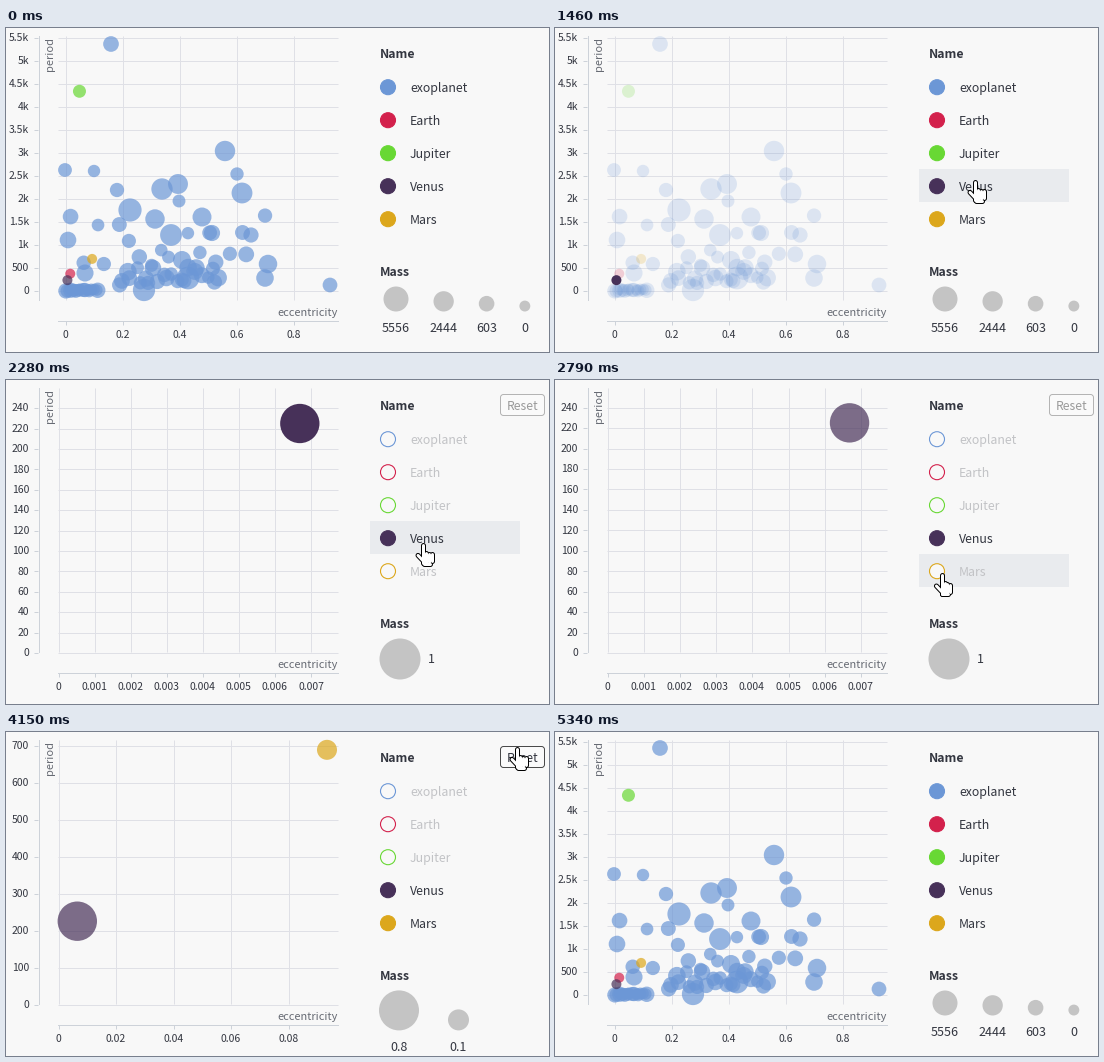
A matplotlib script that plays this animation: 543x324 px, repeating every 6.05 s.

```python
import matplotlib.pyplot as plt
import numpy as np
from matplotlib.animation import FuncAnimation
from matplotlib.collections import LineCollection
from matplotlib.colors import to_rgb
from matplotlib.patches import Circle, FancyBboxPatch, Rectangle
from matplotlib.transforms import Affine2D

W, H, DPI = 543, 324, 72          # at 72 dpi one point is one pixel
LOOP, STEP = 6050, 25
LEFT, RIGHT, TOP, BOTTOM = 52, 332, 8, 272
BG, GRID, AXIS, INK, MUTED = "#f8f8f8", "#dfe0e6", "#cdd2d9", "#333640", "#c2c3c6"

plt.rcParams["font.family"] = ["Noto Sans CJK JP", "DejaVu Sans"]
rng = np.random.default_rng(4)

NAMES = ["exoplanet", "Earth", "Jupiter", "Venus", "Mars"]
COLORS = ["#6c97d6", "#d3214c", "#68d834", "#473159", "#dca71c"]
ROW_Y = [59 + 33 * i for i in range(5)]
PLANETS = {1: (0.0167, 365), 2: (0.049, 4331), 3: (0.0067, 224.7), 4: (0.0934, 687)}

# The conspicuous exoplanets in stage pixels, from largest to smallest
KEY_EXO = [(124, 182), (182, 250), (138, 262), (165, 207), (156, 161), (236, 165),
           (219, 123), (172, 156), (149, 191), (196, 189), (262, 236), (176, 232),
           (259, 250), (79, 245), (62, 212), (206, 205), (105, 16), (245, 207),
           (324, 257), (111, 162), (59, 142), (231, 146), (173, 173), (88, 143)]


def swarm(n, xs, ys, rs):
    """Evenly spread columns with random heights and radii."""
    gap = (xs[1] - xs[0]) / n
    x = np.linspace(*xs, n) + rng.uniform(-gap / 2, gap / 2, n)
    return np.column_stack([x, rng.uniform(*ys, n), rng.uniform(*rs, n)])


def view(x0, kx, y0, ky, xticks, yticks, radii):
    return dict(x0=x0, kx=kx, y0=y0, ky=ky, xticks=xticks, yticks=yticks,
                radii=radii, shown=set(radii))


def steps(step, count):
    return [i * step for i in range(count + 1)]


FULL = view(59.5, 285, 262.5, 0.046, steps(0.2, 4), steps(500, 11),
            {0: 0, 1: 5, 2: 6.5, 3: 5, 4: 5})
ONE = view(52, 36200, 272.5, 1.022, steps(0.001, 7), steps(20, 12), {3: 19.7})
TWO = view(52, 2880, 272.5, 0.3707, steps(0.02, 4), steps(100, 7), {3: 19.7, 4: 10})
VIEWS = [FULL, ONE, TWO]

# start, duration, from, to
MOVES = [(1730, 600, FULL, ONE), (3185, 600, ONE, TWO), (4670, 630, TWO, FULL)]

# time, x, y of the pointer's fingertip
POINTER = np.array([
    (700, 424, -30), (1340, 420, 152), (1770, 420, 152), (2000, 417, 163),
    (2400, 417, 163), (2780, 386, 194), (3830, 386, 194), (4130, 511, 15),
    (4440, 511, 15), (4460, 513, 17), (4930, 513, 17), (5220, 558, 30)])


def lerp(a, b, p):
    return a + (b - a) * p


def ease(u):
    return 4 * u ** 3 if u < 0.5 else 1 - 4 * (1 - u) ** 3


def phase(t):
    """The views before and after the latest move, and its eased progress."""
    for start, length, a, b in reversed(MOVES):
        if t >= start:
            return a, b, ease(min((t - start) / length, 1))
    return FULL, FULL, 1


def tip(t):
    return [np.interp(t, POINTER[:, 0], POINTER[:, k]) for k in (1, 2)]


def hovered(t):
    x, y = tip(t)
    if 364 < x < 514:
        for i, row in enumerate(ROW_Y):
            if abs(y - row) < 16.5:
                return i
    return None


def target_alpha(t):
    row = hovered(t)
    if t < MOVES[1][0] and row in phase(t)[1]["shown"]:
        return [1.0 if i == row else 0.2 for i in range(5)]
    return [0.7] * 5


def mark_alpha(t):
    return np.mean([target_alpha(t - d) for d in range(0, 125, 25)], axis=0)


def pos_x(v, s):
    return min(s["x0"] + s["kx"] * v, RIGHT)


def pos_y(v, s):
    return max(s["y0"] - s["ky"] * v, TOP)


def tick_label(v):
    return f"{v / 1000:g}k" if v >= 1000 else f"{v:g}"


def crisp(v):
    return np.floor(v) + 0.5


def rgba(color, alpha):
    return (*to_rgb(color), alpha)


fig = plt.figure(figsize=(W / DPI, H / DPI), dpi=DPI, facecolor=BG)
ax = fig.add_axes([0, 0, 1, 1])
ax.set_xlim(0, W)
ax.set_ylim(H, 0)
ax.axis("off")


def label(x, y, text, size, color=INK, ha="left", **kw):
    return ax.text(x, y, text, fontsize=size, color=color, ha=ha, va="baseline", **kw)


def disc(x, y, r, **kw):
    return ax.add_patch(Circle((x, y), r, **kw))


# Axes and grid
grid = ax.add_collection(LineCollection([], linewidths=1, zorder=1))
ax.plot([32.5, 32.5], [TOP, BOTTOM], color=AXIS, lw=1, zorder=1)
ax.plot([LEFT, RIGHT], [292.5, 292.5], color=AXIS, lw=1, zorder=1)
label(RIGHT, 288, "eccentricity", 11, "#666a73", "right")
label(47.5, 9, "period", 11, "#666a73", "right", rotation=90, rotation_mode="anchor")
xlabels = {tick_label(v): label(0, 310, tick_label(v), 10.4, ha="center")
           for s in VIEWS for v in s["xticks"]}
ylabels = {tick_label(v): label(23, 0, tick_label(v), 10.4, ha="right")
           for s in VIEWS for v in s["yticks"]}
for spare in list(ax.texts):
    spare.set_visible(spare not in (*xlabels.values(), *ylabels.values())
                      and not spare.get_text()[0].isdigit())

# Marks: exoplanets, then planets
exo = np.vstack([
    np.column_stack([KEY_EXO, np.linspace(11.6, 6.2, len(KEY_EXO))]),
    swarm(16, (59, 92), (261, 263), (5.2, 7.8)),
    swarm(24, (112, 214), (238, 262), (6.2, 9)),
    swarm(18, (66, 256), (184, 238), (5.5, 8)),
])
exo_dots = ax.scatter(exo[:, 0], exo[:, 1], s=(2 * exo[:, 2]) ** 2, linewidths=0, zorder=3)
dots = {i: disc(0, 0, 5, lw=0, zorder=4) for i in (2, 1, 3, 4)}

# Name legend
label(374, 30, "Name", 12.3, weight="bold")
label(374, 248, "Mass", 12.3, weight="bold")
row_bar = ax.add_patch(Rectangle((364, 0), 150, 33, fc="#e9ebee", lw=0, zorder=0))
keys = [(disc(382, y + 0.2, 7.5, ec=color, lw=1.1, zorder=2),
         label(404, y + 4.8, name, 12.3), color)
        for name, color, y in zip(NAMES, COLORS, ROW_Y)]
cross = [ax.plot([379.5, 384.5], [191.2 - d, 191.2 + d], color="white", lw=1.8, zorder=3)[0]
         for d in (2.5, -2.5)]

# Reset button
button = ax.add_patch(FancyBboxPatch((496.5, 16.5), 40, 17, fc="#fafafa", lw=1, zorder=2,
                                     boxstyle="round,pad=2,rounding_size=3"))
button_text = label(516.5, 29.5, "Reset", 12.2, ha="center")


def mass_legend(labels, x, base, r, shrink, pad):
    """Circles standing on one line, each smaller than the last."""
    group = []
    for text in labels:
        group.append(disc(x, base - r, r, fc="#c4c4c4", lw=0))
        group.append(label(x, base + 20.5, text, 12.5, ha="center"))
        x += 2 * r - shrink + pad
        r -= shrink
    return group


masses = [
    mass_legend(["5556", "2444", "603", "0"], 390, 283.5, 12.5, 2.35, 25),
    [disc(394, 279, 20.5, fc="#c4c4c4", lw=0), label(425, 283, "1", 12.5, ha="center")],
    mass_legend(["0.8", "0.1"], 393, 298.4, 20, 9.5, 29),
]

# Hand pointer as round strokes, relative to the fingertip: fingers, thumb, wrist
strokes = [((0.3, 0.3), (1.8, 20))]
strokes += [((0.3 + 2.8 * k,) * 2, (9.2 + 0.7 * k, 21 - k)) for k in (1, 2, 3)]
strokes += [((-5, 0.3), (12.4, 18)), ((1, 7), (20.8, 20.8))]
hand = [ax.plot(xs, ys, color=color, lw=lw, solid_capstyle="round", zorder=z)[0]
        for color, lw, z in (("black", 5, 8), ("white", 3, 9)) for xs, ys in strokes]


def ticks(a, b, p, axis):
    """Yield text, place and opacity for every tick of both views."""
    place = pos_x if axis == "xticks" else pos_y
    old = {tick_label(v): v for v in a[axis]}
    new = {tick_label(v): v for v in b[axis]}
    for text, v in {**old, **new}.items():
        alpha = (text in old) * (1 - p) + (text in new) * p
        if alpha > 0:
            yield text, lerp(place(v, a), place(v, b), p), min(alpha, 1)


def draw_axes(t):
    a, b, p = phase(t)
    if p < 1:
        p = phase(t + 10)[2]      # the axes run slightly ahead of the marks
    for artist in (*xlabels.values(), *ylabels.values()):
        artist.set_visible(False)
    lines, colors = [], []
    for text, x, alpha in ticks(a, b, p, "xticks"):
        xlabels[text].set(visible=True, x=x, alpha=alpha)
        x = crisp(x)
        lines += [[(x, TOP), (x, BOTTOM)], [(x, 293), (x, 297)]]
        colors += [rgba(GRID, alpha), rgba(AXIS, alpha)]
    for text, y, alpha in ticks(a, b, p, "yticks"):
        ylabels[text].set(visible=True, y=y + 3.8, alpha=alpha)
        y = crisp(y)
        lines += [[(LEFT, y), (RIGHT, y)], [(28, y), (32, y)]]
        colors += [rgba(GRID, alpha), rgba(AXIS, alpha)]
    grid.set_segments(lines)
    grid.set_color(colors)


def draw_marks(t):
    a, b, p = phase(t)
    base = mark_alpha(t)

    def fade(i):
        return min(base[i] * ((i in a["shown"]) * (1 - p) + (i in b["shown"]) * p), 1)

    exo_dots.set_facecolor(rgba(COLORS[0], fade(0)))
    for i, dot in dots.items():
        ecc, period = PLANETS[i]
        start = a if i in a["shown"] else b
        end = b if i in b["shown"] else a
        alpha = fade(i)
        dot.set_visible(alpha > 0)
        if alpha > 0:
            dot.center = (lerp(pos_x(ecc, start), pos_x(ecc, end), p),
                          lerp(pos_y(period, start), pos_y(period, end), p))
            dot.set_radius(lerp(start["radii"][i], end["radii"][i], p))
            dot.set_facecolor(rgba(COLORS[i], alpha))


def draw_legend(t):
    now = phase(t)[1]
    x, y = tip(t)
    row = hovered(t)
    row_bar.set_visible(row is not None)
    if row is not None:
        row_bar.set_y(ROW_Y[row] - 17)
    for i, (dot, text, color) in enumerate(keys):
        on = i in now["shown"]
        dot.set_facecolor(color if on else BG)
        text.set_color(INK if on else MUTED)
    for line in cross:
        line.set_visible(now is TWO and row == 4 and x < 392)
    over = x > 494 and 13 < y < 37
    button.set(visible=now is not FULL, edgecolor="#4a4a4a" if over else "#b4b4b4")
    button_text.set(visible=now is not FULL, color=INK if over else "#9b9b9b")
    for s, group in zip(VIEWS, masses):
        for artist in group:
            artist.set_visible(s is now)


def update(i):
    t = i * STEP
    draw_axes(t)
    draw_marks(t)
    draw_legend(t)
    shift = Affine2D().translate(*tip(t)) + ax.transData
    for part in hand:
        part.set_transform(shift)
    return []


# Labels shared by two views are created twice; keep only the registered one
anim = FuncAnimation(fig, update, frames=LOOP // STEP, interval=STEP,
                     repeat=True, repeat_delay=0, blit=False)
plt.show()
```
